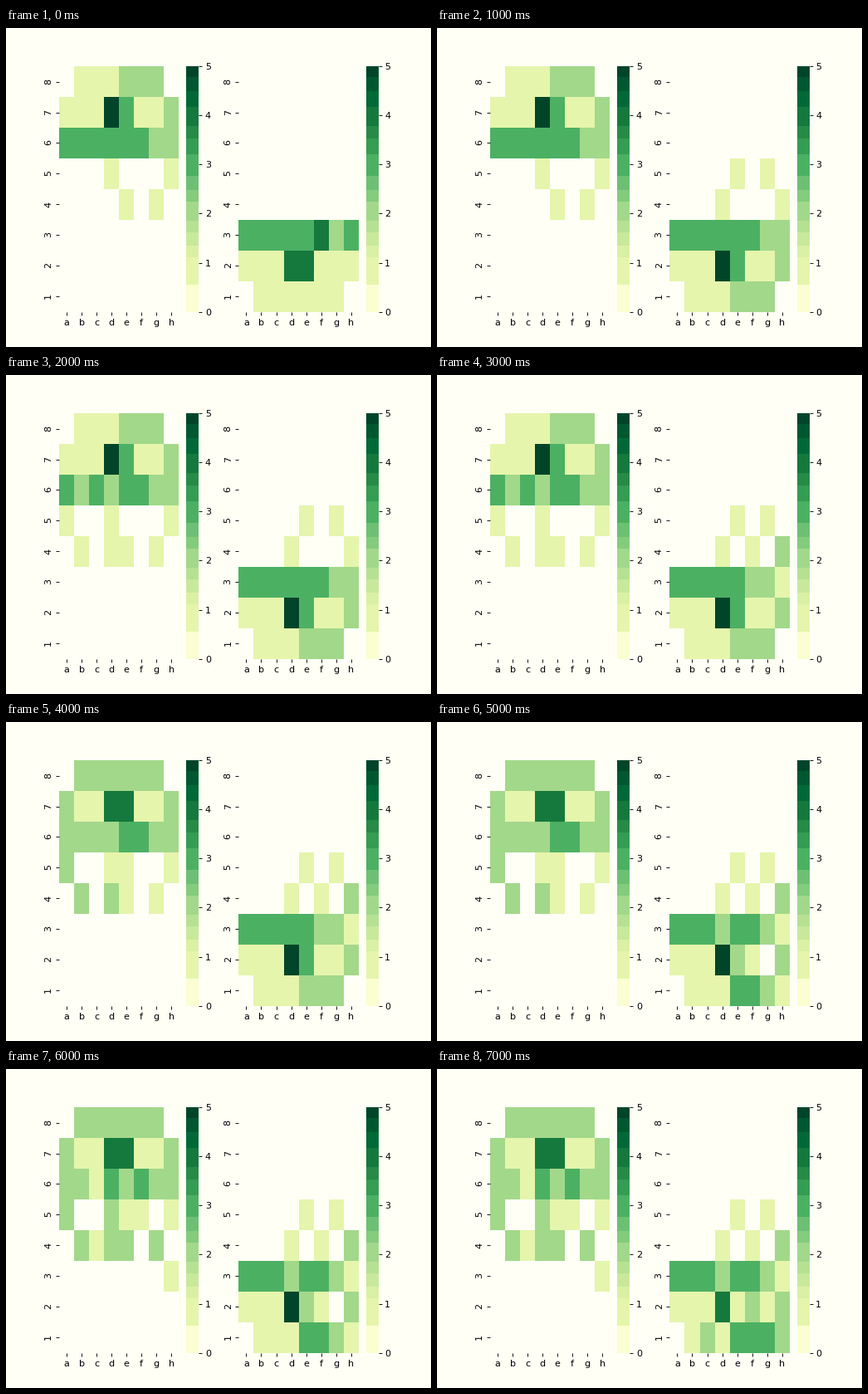
A matplotlib script that plays this animation: 512x384 px, repeating every 8000 ms.

```python
import numpy as np
import matplotlib.pyplot as plt
from matplotlib.animation import FuncAnimation
from matplotlib.colors import ListedColormap

PAPER = "#fffff6"
FILES = list("abcdefgh")

# Attack counts per rank (files a-h); each step lists only the ranks that change.
BLACK = [
    {8: "01112220", 7: "11153112", 6: "33333322", 5: "00010001", 4: "00001010"},
    {6: "32323322", 5: "10010001", 4: "01011010"},
    {8: "02222220", 7: "21144112", 6: "22223322", 5: "20011001", 4: "02021010"},
    {6: "22132322", 5: "20021101", 4: "02122020", 3: "00000001"},
]
WHITE = [
    {3: "33333423", 2: "11144111", 1: "01111110"},
    {9 - rank: counts for rank, counts in BLACK[0].items()},
    {4: "00010102", 3: "33333221"},
    {3: "33323321", 2: "11152102", 1: "01113321"},
    {2: "11141212", 1: "01213332"},
]


def boards(steps):
    """Apply the steps one after another; row 0 is rank 8, zeros are masked."""
    grid = np.zeros((8, 8))
    result = []
    for step in steps:
        for rank, counts in step.items():
            grid[8 - rank] = [int(c) for c in counts]
        result.append(np.ma.masked_equal(grid.copy(), 0))
    return result


def banded_map():
    """YlGn reduced to a few flat bands."""
    edges = [.108, .223, .270, .324, .372, .449, .497, .554,
             .642, .706, .757, .838, .899, .959]
    tones = [.06, .2, .247, .297, .348, .4, .473, .525,
             .6, .674, .73, .8, .868, .93, 1.0]
    band = np.searchsorted(edges, np.linspace(0, 1, 256))
    return ListedColormap(plt.get_cmap("YlGn")(np.array(tones)[band]))


def heatmap(ax, grid, cmap):
    mesh = ax.pcolormesh(grid, cmap=cmap, vmin=0, vmax=5)
    ax.set(xlim=(0, 8), ylim=(8, 0), facecolor=PAPER)
    centers = np.arange(8) + 0.5
    ax.set_xticks(centers, FILES)
    ax.set_yticks(centers, range(8, 0, -1), rotation="vertical")
    ax.spines[:].set_visible(False)
    bar = fig.colorbar(mesh, ax=ax, ticks=range(6))
    bar.outline.set_linewidth(0)
    return mesh


fig, axes = plt.subplots(1, 2, figsize=(6.4, 4.8), dpi=80, facecolor=PAPER)
black, white = boards(BLACK), boards(WHITE)
cmap = banded_map()
left = heatmap(axes[0], black[0], cmap)
right = heatmap(axes[1], white[0], cmap)


def update(ply):
    # White and black move in turn.
    left.set_array(black[ply // 2])
    right.set_array(white[(ply + 1) // 2])
    return left, right


anim = FuncAnimation(fig, update, frames=8, interval=1000, repeat=True,
                     repeat_delay=0)
plt.show()
```
